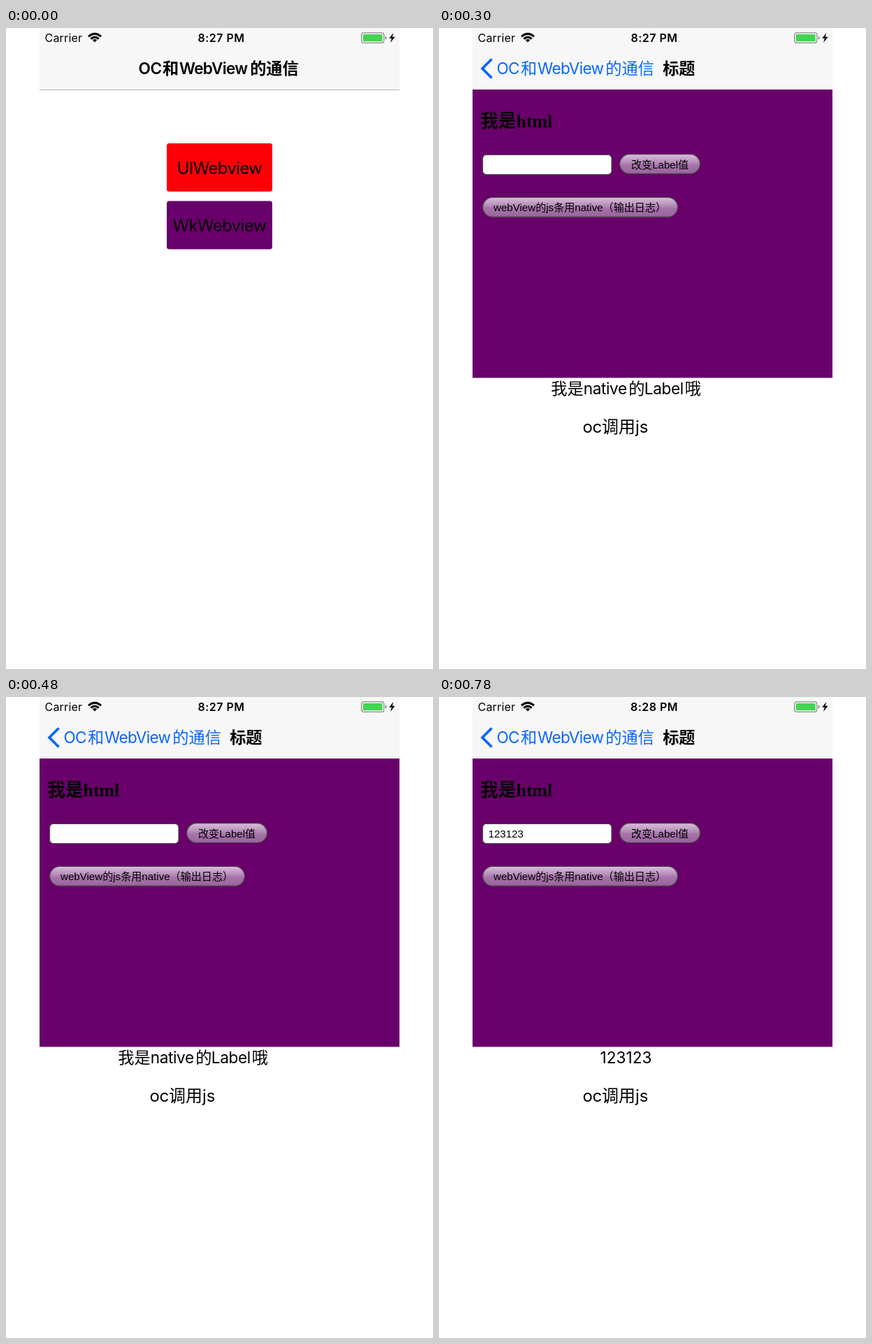
An HTML page for the animation above (0.9 s loop, 611x917 px).

```html
<!DOCTYPE html>
<html lang="zh-CN">
<head>
<meta charset="utf-8">
<style>
  html, body { margin: 0; width: 100%; height: 100%; overflow: hidden; background: #fff; }
  svg { display: block; width: 611px; height: 917px; }
  text { font: 22.6px Inter, "Noto Sans CJK SC", "Noto Sans CJK", sans-serif; white-space: pre; }
  .cjk { font-size: 23.2px; letter-spacing: 0; }
  .tight { letter-spacing: -.7px; }
  .label { letter-spacing: -.4px; }
  .bold { font-weight: 600; }
  .status { font-size: 16px; letter-spacing: .2px; }
  .clock { font-size: 16px; font-weight: 600; letter-spacing: .45px; text-anchor: middle; }
  .button { font-size: 24px; letter-spacing: -.65px; text-anchor: middle; }
  .web { font: 15.1px "Liberation Sans", "Noto Sans CJK SC", "Noto Sans CJK", sans-serif; }
  .heading { font: bold 25.8px "Liberation Serif", "Noto Sans CJK SC", "Noto Sans CJK", serif; }
</style>
</head>
<body>
<svg viewBox="0 0 611 917">
  <defs>
    <linearGradient id="gloss" x2="0" y2="1">
      <stop offset="0" stop-color="#d9c0dc"/>
      <stop offset=".45" stop-color="#b388b6"/>
      <stop offset=".55" stop-color="#a673aa"/>
      <stop offset="1" stop-color="#9a649d"/>
    </linearGradient>
  </defs>

  <rect x="48" width="515" height="88" fill="#f7f7f7"/>

  <!-- status bar -->
  <text class="status" x="55.5" y="20">Carrier</text>
  <g fill="none" stroke="#000" stroke-width="3">
    <path d="M118 12.2Q127 4.2 136 12.2"/>
    <path d="M121.3 15.6Q127 10.6 132.7 15.6"/>
    <path d="M123.8 17.2Q127 14.6 130.2 17.2L127 20.6Z" fill="#000" stroke="none"/>
  </g>
  <text class="clock" id="clock" x="308" y="20"></text>
  <rect x="508.6" y="6.9" width="32.2" height="14.4" rx="3" fill="none" stroke="#8b8b8b" stroke-width="1.2"/>
  <rect x="510.8" y="9" width="27.8" height="10.2" rx="1" fill="#43d551"/>
  <path d="M542.6 11.5Q544.8 12 544.8 14T542.6 16.6Z" fill="#8b8b8b"/>
  <path d="M554.3 7L548.2 14.8H551.8L550 21L556.6 12.8H552.8Z"/>

  <g id="menu">
    <rect x="48" y="88" width="515" height="1" fill="#b3b3b3"/>
    <text class="bold tight" y="66"><tspan x="189.5" letter-spacing="-.3">OC</tspan><tspan class="cjk" x="224">和</tspan><tspan x="248">WebView</tspan><tspan class="cjk" x="349.2">的通信</tspan></text>
    <rect x="230" y="165" width="151" height="69" rx="3.5" fill="#fd0007"/>
    <text class="button" x="305.5" y="208.5">UIWebview</text>
    <rect x="230" y="247.5" width="151" height="69" rx="3.5" fill="#6a006b"/>
    <text class="button" x="305.5" y="291">WkWebview</text>
  </g>

  <g id="page">
    <path d="M75.5 44.5L62 58L75.5 71.5" fill="none" stroke="#0a66ff" stroke-width="3.8"/>
    <text class="tight" y="66" fill="#0a66ff"><tspan x="82.5">OC</tspan><tspan class="cjk" x="117">和</tspan><tspan x="141">WebView</tspan><tspan class="cjk" x="238.3">的通信</tspan></text>
    <text class="bold cjk" x="320.2" y="66">标题</text>

    <rect x="48" y="88" width="515" height="412.5" fill="#6a006b"/>
    <text class="heading" x="59" y="142">我是html</text>
    <rect x="62.5" y="181.5" width="184.5" height="28" rx="5" fill="#fff" stroke="#4c4c4c" stroke-width="1.2"/>
    <text class="web" id="field" x="70.5" y="200.5"></text>
    <g fill="url(#gloss)" stroke="#4c4c4c" stroke-width="1.3">
      <rect x="258.7" y="180.6" width="114.8" height="27.8" rx="13.9"/>
      <rect x="62.7" y="242.4" width="278.8" height="27.8" rx="13.9"/>
    </g>
    <text class="web" x="275" y="200.5">改变Label值</text>
    <text class="web" x="78" y="262.3">webView的js条用native（输出日志）</text>

    <text class="label" id="hint" y="524"><tspan class="cjk" x="160.3">我是</tspan><tspan x="206.8">native</tspan><tspan class="cjk" x="271.2">的</tspan><tspan x="293.8">Label</tspan><tspan class="cjk" x="351.7">哦</tspan></text>
    <text id="echo" x="267.5" y="524" text-anchor="middle">123123</text>
    <text y="579" style="font-size:24px"><tspan x="205.5" letter-spacing="-.3">oc</tspan><tspan x="233" style="font-size:24px">调用</tspan><tspan x="281">js</tspan></text>
  </g>
</svg>
<script>
  const $ = id => document.getElementById(id);
  const show = (id, on) => $(id).style.display = on ? '' : 'none';
  const STEP = 300;
  let shown = -1;

  function draw(step) {
    show('menu', step === 0);
    show('page', step > 0);
    show('hint', step === 1);
    show('echo', step === 2);
    $('clock').textContent = step === 2 ? '8:28 PM' : '8:27 PM';
    $('field').textContent = step === 2 ? '123123' : '';
  }

  function tick() {
    const step = Math.floor(performance.now() / STEP) % 3;
    if (step !== shown) draw(shown = step);
    requestAnimationFrame(tick);
  }
  tick();
</script>
</body>
</html>
```
